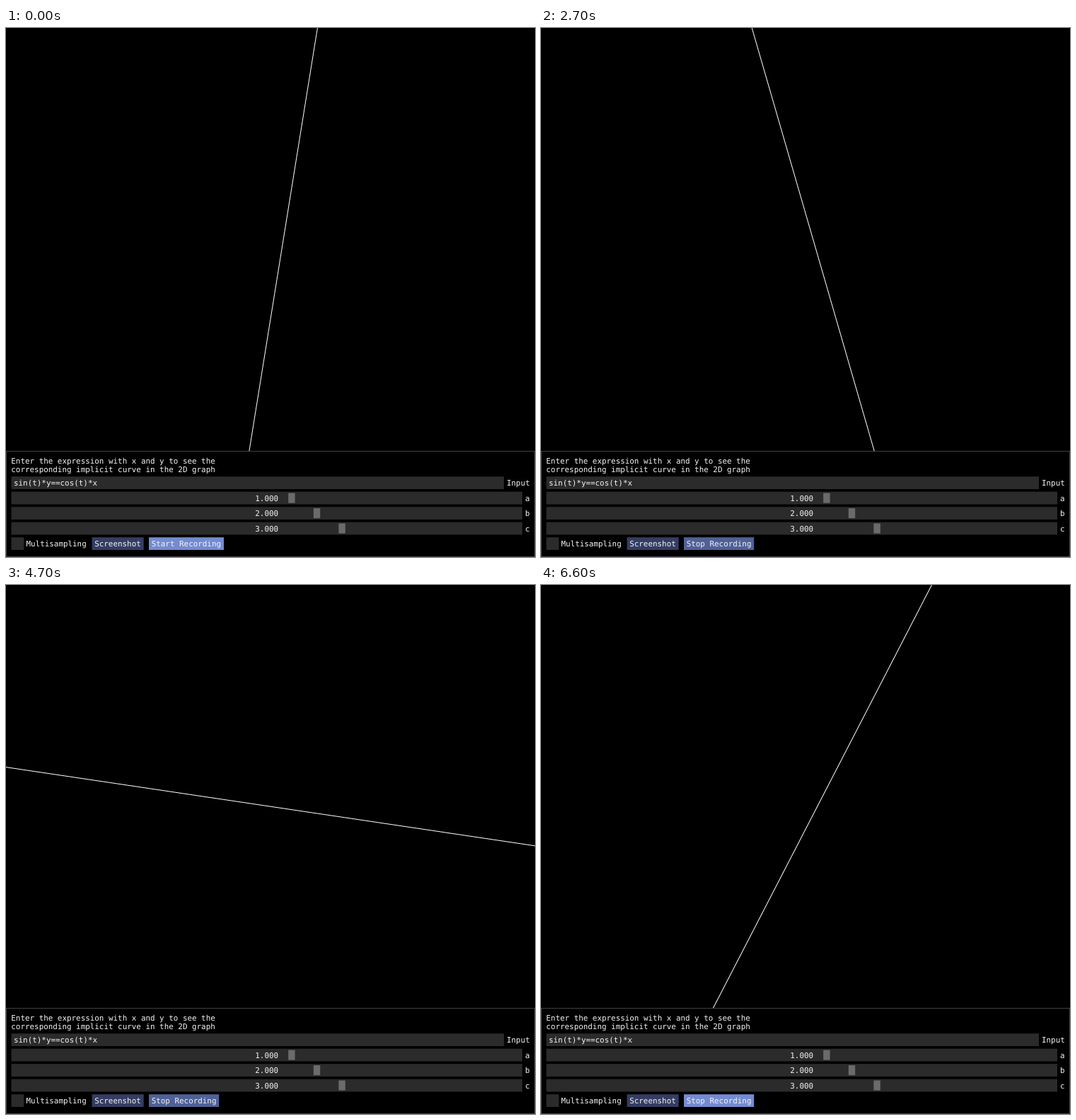
Animation of 748 by 748 pixels, one loop 6700 ms. Source, as an HTML page:

```html
<!DOCTYPE html>
<html lang="en">
<head>
<meta charset="utf-8">
<title>Implicit curve plotter</title>
<style>
  html, body { margin: 0; width: 100%; height: 100%; overflow: hidden; background: #000; }
  svg { display: block; width: 748px; height: 748px; }
  text {
    font: 10.9px "DejaVu Sans Mono", "Liberation Mono", monospace;
    fill: #f4f4f4;
    text-rendering: geometricPrecision;
    white-space: pre;
  }
  .field { fill: #2b2b2b; }
  .grab { fill: #6b6b6b; }
  .border { fill: none; stroke: #404045; }
  .shot { fill: #343d62; }

  /* The curve sin(t)*y = cos(t)*x is a line turned clockwise by t radians. */
  .curve {
    stroke: #fff;
    stroke-width: 1.25;
    shape-rendering: crispEdges;
    transform-origin: 389.5px 315.5px;
    animation: turn 6.7s steps(67) infinite;
  }
  @keyframes turn {
    from { transform: rotate(0.16rad); }
    to { transform: rotate(6.86rad); }
  }

  .start, .stop, .rec { animation: 6.7s step-end infinite; }
  .start { animation-name: show-start; }
  .stop { animation-name: show-stop; }
  .rec { animation-name: hover; }
  @keyframes show-start {
    0% { visibility: visible; }
    1.49%, 100% { visibility: hidden; }
  }
  @keyframes show-stop {
    0% { visibility: hidden; }
    1.49%, 100% { visibility: visible; }
  }
  @keyframes hover {
    0% { fill: #748bd2; }
    5.96% { fill: #4f6197; }
    97.01%, 100% { fill: #748bd2; }
  }
</style>
</head>
<body>
<svg viewBox="0 0 748 748">
  <clipPath id="plot"><rect width="748" height="598"/></clipPath>
  <g clip-path="url(#plot)">
    <line class="curve" x1="389.5" y1="-500" x2="389.5" y2="1130"/>
  </g>

  <rect class="border" x=".5" y="598.5" width="747" height="149"/>
  <text x="7.3" y="616">Enter the expression with x and y to see the</text>
  <text x="7.3" y="628">corresponding implicit curve in the 2D graph</text>

  <rect class="field" x="7.5" y="634.2" width="696.5" height="17.8"/>
  <text x="11" y="647">sin(t)*y==cos(t)*x</text>
  <text x="708" y="647">Input</text>

  <g id="sliders"></g>

  <rect class="field" x="7.5" y="720.2" width="17.8" height="17.8"/>
  <text x="28.5" y="733.3">Multisampling</text>
  <rect class="shot" x="121.5" y="720.2" width="73.2" height="17.8"/>
  <text x="125.2" y="733.3">Screenshot</text>
  <g class="start">
    <rect class="rec" x="202" y="720.2" width="106" height="17.8"/>
    <text x="205.7" y="733.3">Start Recording</text>
  </g>
  <g class="stop">
    <rect class="rec" x="202" y="720.2" width="99.2" height="17.8"/>
    <text x="205.7" y="733.3">Stop Recording</text>
  </g>
</svg>
<script>
  const slider = (name, i) => {
    const y = 655.7 + 21.5 * i;
    const grabX = 399.2 + 35.6 * i;
    return `
      <rect class="field" x="7.5" y="${y}" width="722.5" height="17.8"/>
      <rect class="grab" x="${grabX}" y="${y + 1.9}" width="9.4" height="14"/>
      <text x="368.7" y="${y + 13}" text-anchor="middle">${(i + 1).toFixed(3)}</text>
      <text x="734" y="${y + 13}">${name}</text>`;
  };
  document.getElementById("sliders").innerHTML = ["a", "b", "c"].map(slider).join("");
</script>
</body>
</html>
```
